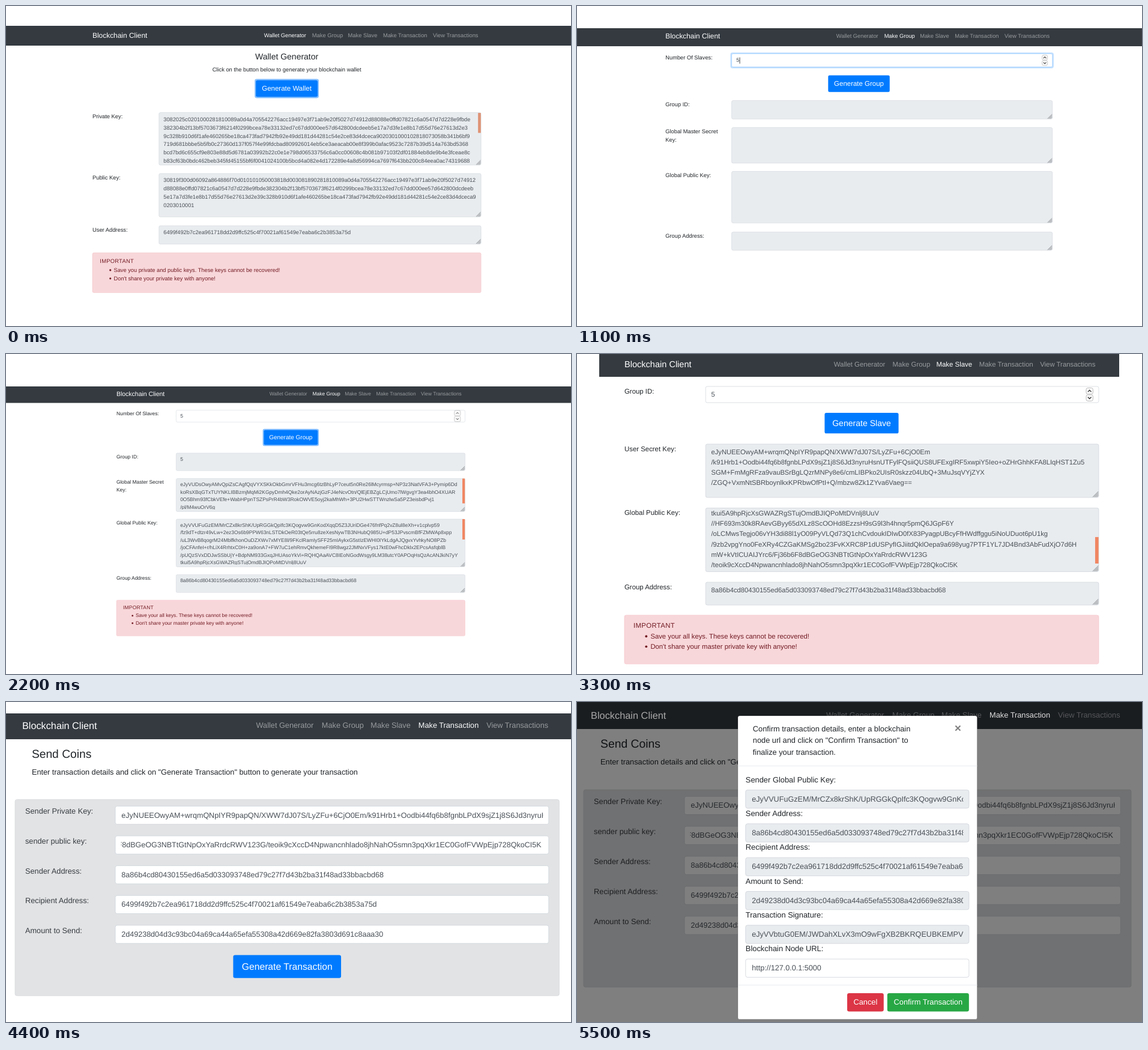
An HTML page that plays this animation: 941x533 px, repeating every 6.6 s.

```html
<!DOCTYPE html>
<html lang="en">
<head>
<meta charset="utf-8">
<title>Blockchain Client</title>
<style>
html, body { margin: 0; width: 100%; height: 100%; overflow: hidden; background: #fff; }
svg { display: block; }
text { font-family: "Liberation Sans", Arial, sans-serif; text-rendering: geometricPrecision; white-space: pre; }
</style>
</head>
<body>
<svg id="stage" width="941" height="533" viewBox="0 0 941 533"></svg>
<script>
const HOLD = 1100;
const INK = '#212529', MUTED = '#495057', BLUE = '#007bff';
const LINKS = [['Wallet Generator', 490], ['Make Group', 627.5], ['Make Slave', 730],
  ['Make Transaction', 830], ['View Transactions', 972.5]];
const LIGHT = { bar: '#343a40', brand: '#fff', link: '#999c9f', on: '#fff' };
const DARK = { bar: '#1a1d20', brand: '#a8a8a8', link: '#55575a', on: '#dedede' };

const text = (x, y, str, size = 16, fill = INK, extra = '') =>
  `<text x="${x}" y="${y}" font-size="${size}" fill="${fill}" ${extra}>${str}</text>`;
const mid = 'text-anchor="middle"';
const box = (x, y, w, h, fill, stroke = 'none', extra = '') =>
  `<rect x="${x}" y="${y}" width="${w}" height="${h}" rx="4" fill="${fill}" stroke="${stroke}" ${extra}/>`;
const bar = (x, y, w, h, fill, extra = '') =>
  `<rect x="${x}" y="${y}" width="${w}" height="${h}" fill="${fill}" ${extra}/>`;
const group = (x, y, s, body) => `<g transform="translate(${x} ${y}) scale(${s})">${body}</g>`;
const label = (y, str, x = 0, fill = INK) =>
  str.split('\n').map((line, i) => text(x, y + 16.3 + 24 * i, line, 16, fill)).join('');

// Text inside a control, cut off at its padding
function inner(x, y, w, h, str, { size = 15.76, scroll = 0, pad = 12, end = false } = {}) {
  const lines = str.split('\n').map((line, i) =>
    text(end ? w - 27.5 : 1, 17.5 + 24 * i - scroll, line, size, MUTED, end ? 'text-anchor="end"' : ''));
  return `<svg x="${x + 12}" y="${y + 6.5}" width="${w - 12 - pad}" height="${h - 13}">${lines.join('')}</svg>`;
}

function area(y, h, str = '', { thumb, thumbFill = '#f08763', ...opt } = {}) {
  const grip = [13, 10, 7, 4].map(d => `M${1109 - d} ${y + h - 1}L1109 ${y + h - 1 - d}`).join('');
  return box(190, y, 920, h, '#e9ecef', '#ced4da') + inner(190, y, 920, h, str, { pad: 4, ...opt }) +
    (thumb ? bar(1101.5, y + thumb[0], 8, thumb[1], thumbFill) : '') +
    `<path d="${grip}" stroke="#808387" stroke-width="1.3"/>`;
}

function input(x, y, w, str, { fill = '#fff', ...opt } = {}) {
  return box(x, y, w, 38, fill, '#ced4da') + inner(x, y, w, 38, str, opt);
}

function spinner(x, y, w, h) {
  const c = x + w / 2;
  const half = (top, dir) => box(x, top, w, h, '#fafafa', '#a5a5a5') +
    `<path d="M${c - 4} ${top + h / 2 + 2 * dir}l4 ${-4 * dir}l4 ${4 * dir}" fill="none" stroke="#333" stroke-width="1.8"/>`;
  return half(y, 1) + half(y + h + 1.6, -1);
}

function button(y, w, str, { focus = false, size = 19.75 } = {}) {
  const ring = focus ? box(555 - w / 2 - 1.6, y - 1.6, w + 3.2, 51.2, 'none', '#80bdff', 'stroke-width="3.4"') : '';
  return ring + box(555 - w / 2, y, w, 48, BLUE) + text(555, y + 30.6, str, size, '#fff', mid);
}

function alertBox(y, ...items) {
  const red = '#721c24';
  return box(0, y, 1110, 114, '#f8d7da', '#f5c6cb') +
    text(21, y + 29.6, 'IMPORTANT', 16, red, 'letter-spacing=".5"') +
    items.map((str, i) => `<circle cx="51" cy="${y + 49.5 + 24 * i}" r="2.7" fill="${red}"/>` +
      text(61, y + 54.4 + 24 * i, str, 15.87, red)).join('');
}

// top and bottom are the visible edges of the bar, left is where the page column starts
function navbar({ s, left, top, bottom, x = 0, w = 941, shift = 0, brand = 20.45 }, active, tone = LIGHT) {
  return bar(x, top, w, bottom - top, tone.bar) + group(left, bottom - 56 * s, s,
    text(0, 34.2, 'Blockchain Client', brand, tone.brand) +
    LINKS.map(([str, lx], i) => text(lx + shift, 32.7, str, 16, i === active ? tone.on : tone.link)).join(''));
}
const column = (v, body) => group(v.left, v.bottom - 56 * v.s, v.s, body);
const page = (v, active, body) => navbar(v, active) + column(v, body);

const userAddress = '6499f492b7c2ea961718dd2d9ffc525c4f70021af61549e7eaba6c2b3853a75d';
const groupAddress = '8a86b4cd80430155ed6a5d033093748ed79c27f7d43b2ba31f48ad33bbacbd68';
const amount = '2d49238d04d3c93bc04a69ca44a65efa55308a42d669e82fa3803d691c8aaa30';
const walletPrivate = `3082025c0201000281810089a0d4a705542276acc19497e3f71ab9e20f5027d74912d88088e0ffd07821c6a0547d7d228e9fbde
382304b2f13bf5703673f6214f0299bcea78e33132ed7c67dd000ee57d642800dcdeeb5e17a7d3fe1e8b17d55d76e27613d2e3
9c328b910d6f1afe460265be18ca473fad7942fb92e49dd181d44281c54e2ce83d4dceca9020301000102818073058b341b6bf9
719d681bbbe5b5fb0c27360d137f057f4e99fdcbad809926014eb5ce3aeacab00e8f399b0afac9523c7287b39d514a763bd5368
bcd7bd6c655cf9e803e88d5d6781a03992b22c0e1e798d06533756c6a0cc00608c4b081b97103f2df01884eb8de9b4e3fceae8c
b83cf63b0bdc462beb345fd45155bf6f0041024100b5bcd4a082e4d172289e4a8d56994ca7697f643bb200c84eea0ac74319688`;
const walletPublic = `30819f300d06092a864886f70d010101050003818d003081890281810089a0d4a705542276acc19497e3f71ab9e20f5027d74912
d88088e0ffd07821c6a0547d7d228e9fbde382304b2f13bf5703673f6214f0299bcea78e33132ed7c67dd000ee57d642800dcdeeb
5e17a7d3fe1e8b17d55d76e27613d2e39c328b910d6f1afe460265be18ca473fad7942fb92e49dd181d44281c54e2ce83d4dceca9
0203010001`;
const masterKey = `eJyVUDsOwyAMvQpiZsCAgfQqVYXSKkOkbGmrVFHu3mcg6tzBhLyP7ceut5n0Re26lMcyrmsp+NP3z3NatVFA3+Pymip6Dd
koRsXBqGTxTUYNKLIBBzmjMqMi2KGpyDmh4Qke2orAyNAzjGzFJ4eNcvOtn/QlEjEBZgLCjUmo7lWgvgY3ea4bhO4XUAR
0O5Bhm93fCbkVEfe+WabHPpnTSZPsPrR4bW3RokOWVE5oyj2kaMhWh+3PU2HwSTTWnzlwSa5PZ3eisbdPvj1
/pl/M4wuOrV6g`;
const publicStart = 'eJyVVUFuGzEM/MrCZx8krShK/UpRGGkQpIfc3KQogvw9GnKodXqqD5Z3JUriDGe476fnfPq2vZ8ul8eXh+v1cplvp59';
const publicJoint = 'tkui5A9hpRjcXsGWAZRgSTujOmdBJIQPoMtDVnlj8UuV';
const publicHead = `${publicStart}
/fz9dT+dtzr49vLw+2ez3Os6b9PPW63nLSTDkOeR03tQe5rru8zeXesNywTB3NHubQ985U+dP53JPvscmBfFZMWAp8xpp
/uL3WvB8qogrM24MblfkhonOuDZXWv7xMYE8l/9FKclRamIySFF25mIAykxG5stIzEWHI0IYkLdgAJQgvxYvhkyNO8PZb
/joCFAnfeI+r/hLiX4RrhtxC0H+za9onA7+FW7uC1ehRmvQkhemeFI9R8wgz2JMNxVFys17ktE0wFhcDklx2EPcsAsfqblB
/pUQzSVxDDJwSSbUjY+BdpNM933GxqJHUAsoYkVi+RQHQAaAVC8IEoNGodWsgy9LM38utcY0APOqHsQzAcANJkiN7yY
${publicJoint}`;
const publicTail = `${publicJoint}
//HF693m30k8RAevGByy65dXLz8ScOOHd8EzzsH9sG9l3h4hnqr5pmQ6JGpF6Y
/oLCMwsTegjo06vYH3di88l1yO09PyVLQd73Q1chCvdoukIDIwD0fX83PyagpUBcyFfHWdffggu5iNoUDuot6pU1kg
/9zb2vpgYno0FeXRy4CZGaKMSg2bo23FvKXRC8P1dUSPyfIGJiitdQklOepa9a698yug7PTF1YL7JD4Bnd3AbFudXjO7d6H
mW+kVtICUAIJYrc6/Fj36b6F8dBGeOG3NBTtGtNpOxYaRrdcRWV123G
/teoik9cXccD4Npwancnhlado8jhNahO5smn3pqXkr1EC0GofFVWpEjp728QkoCI5K`;
const userSecret = `eJyNUEEOwyAM+wrqmQNpIYR9papQN/XWW7dJ07S/LyZFu+6CjO0Em
/k91Hrb1+Oodbi44fq6b8fgnbLPdX9sjZ1j8S6Jd3nyruHsnUTFylFQsiiQUS8UFExgIRF5xwpiY5Ieo+oZHrGhhKFA8LIqHST1Zu5
SGM+FmMgRFza9vauBSrBgLQzrMNPy8e6/cmLIBPko2UIsR0skzz04UbQ+3MuJsqVYjZYX
/ZGQ+VxmNtSBRboynlkxKPRbwOfPtI+Q/mbzw8Zk1ZYva6Vaeg==`;
const keysLost = 'Save your all keys. These keys cannot be recovered!';
const keepMaster = "Don't share your master private key with anyone!";

function wallet() {
  return page({ s: .583, left: 144, top: 33, bottom: 66 }, 0,
    text(555, 95.5, 'Wallet Generator', 24, INK, mid) +
    text(555, 130, 'Click on the button below to generate your blockchain wallet', 16, INK, mid) +
    button(154.6, 176.5, 'Generate Wallet', { focus: true }) +
    label(247.3, 'Private Key:') + area(247.3, 150, walletPrivate, { thumb: [1, 57], thumbFill: '#de9375' }) +
    label(421.4, 'Public Key:') + area(421.4, 124, walletPublic) +
    label(570.6, 'User Address:') + area(570.6, 52.5, userAddress) +
    alertBox(647.8, 'Save you private and public keys. These keys cannot be recovered!',
      "Don't share your private key with anyone!"));
}

function emptyGroup() {
  return page({ s: .5806, left: 147.3, top: 37, bottom: 67 }, 1,
    label(77.5, 'Number Of Slaves:') +
    box(188.2, 75.7, 923.6, 41.6, 'none', '#bfdeff', 'stroke-width="3.6"') +
    box(190, 77.5, 920, 38, '#fff', '#80bdff') + inner(190, 77.5, 920, 38, '5') +
    bar(212.5, 88, 1.4, 18, INK) + spinner(1080.5, 81.5, 15.5, 14) +
    button(139.5, 176.5, 'Generate Group') +
    label(211.9, 'Group ID:') + area(211.9, 53) +
    label(289.4, 'Global Master Secret\nKey:') + area(289.4, 102) +
    label(415, 'Global Public Key:') + area(415, 148) +
    label(589, 'Group Address:') + area(589, 52.5));
}

function filledGroup() {
  const size = 16.1;
  return page({ s: .523, left: 184, top: 54, bottom: 81.5, shift: -3, brand: 20 }, 1,
    label(79, 'Number Of Slaves:') + input(190, 79, 920, '5', { size }) + spinner(1076, 80, 19.5, 17) +
    button(142, 172, 'Generate Group', { focus: true, size: 19.1 }) +
    label(215.7, 'Group ID:') + area(215.7, 56, '5', { size }) +
    label(296.9, 'Global Master Secret\nKey:') + area(296.9, 105, masterKey, { size, thumb: [0, 79] }) +
    label(426, 'Global Public Key:') + area(426, 152, publicHead, { size, thumb: [0, 65] }) +
    label(602.9, 'Group Address:') + area(602.9, 57, groupAddress, { size }) +
    alertBox(684.1, keysLost, keepMaster));
}

function slave() {
  return page({ s: .7117, left: 79, top: 0, bottom: 38, x: 37, w: 866 }, 2,
    label(78.5, 'Group ID:') + input(190, 78.5, 920, '5') + spinner(1080.5, 82, 16, 14.5) +
    button(140.4, 173, 'Generate Slave') +
    label(213.4, 'User Secret Key:') + area(213.4, 125, userSecret) +
    label(363, 'Global Public Key:') + area(363, 149, publicTail, { scroll: 6, thumb: [68, 62] }) +
    label(536.6, 'Group Address:') + area(536.6, 53.5, groupAddress) +
    alertBox(613.9, keysLost, keepMaster));
}

function sendForm() {
  const rows = [
    ['Sender Private Key:', userSecret.replace(/\n/g, '').slice(0, 140)],
    ['sender public key:', publicTail.replace(/\n/g, '').slice(-110), { end: true }],
    ['Sender Address:', groupAddress],
    ['Recipient Address:', userAddress],
    ['Amount to Send:', amount]];
  return text(20, 94.8, 'Send Coins', 24.2) +
    text(20, 129.8, 'Enter transaction details and click on "Generate Transaction" button to generate your transaction') +
    box(-15, 182.4, 1140, 411, '#e2e3e5', '#d6d8db') +
    rows.map(([name, value, opt], i) => {
      const y = 196.2 + 62.4 * i;
      return label(y, name, 6.3, '#383d41') + input(195, y, 908, value, opt);
    }).join('') +
    button(508.2, 226, 'Generate Transaction');
}

function modal() {
  const rows = [
    ['Sender Global Public Key:', publicStart], ['Sender Address:', groupAddress],
    ['Recipient Address:', userAddress], ['Amount to Send:', amount],
    ['Transaction Signature:', 'eJyVVbtuG0EM/JWDahXLvX3mO9wFgXB2BKRQEUBKEMPV'],
    ['Blockchain Node URL:', 'http://127.0.0.1:5000']];
  const intro = ['Confirm transaction details, enter a blockchain',
    'node url and click on "Confirm Transaction" to', 'finalize your transaction.'];
  const action = (x, w, str, fill) => box(x, 577.5, w, 38, fill) + text(x + w / 2, 601.2, str, 16, '#fff', mid);
  return group(268, 23, .8,
    box(0, 0, 498, 632, '#fff', 'rgba(0,0,0,.2)') +
    intro.map((str, i) => text(31, 32.3 + 24.3 * i, str)).join('') +
    text(458, 34, '×', 24, '#808080', mid + ' font-weight="bold"') +
    bar(0, 103.8, 498, 1.2, '#e9ecef') + bar(0, 560, 498, 1.2, '#e9ecef') +
    rows.map(([name, value], i) => {
      const y = 154.4 + 70.4 * i;
      return text(16, y - 16, name, 16.1) + input(16, y, 465, value, { fill: i < 5 ? '#e9ecef' : '#fff' });
    }).join('') +
    action(227.5, 76, 'Cancel', '#dc3545') + action(311, 170, 'Confirm Transaction', '#28a745'));
}

const send = () => page({ s: .795, left: 27, top: 19, bottom: 62 }, 3, sendForm());

function confirmSend() {
  const view = { s: .8, left: 23, top: 0, bottom: 45 };
  return column(view, sendForm()) + bar(0, 0, 941, 533, '#000', 'opacity=".5"') +
    navbar(view, 3, DARK) + modal();
}

const stage = document.getElementById('stage');
stage.innerHTML = [wallet, emptyGroup, filledGroup, slave, send, confirmSend]
  .map(draw => `<g display="none">${draw()}</g>`).join('');
const scenes = [...stage.children];

function render(ms) {
  const now = Math.floor(ms / HOLD) % scenes.length;
  scenes.forEach((g, i) => g.setAttribute('display', i === now ? 'inline' : 'none'));
}

const start = performance.now();
function tick() {
  render(performance.now() - start);
  requestAnimationFrame(tick);
}
tick();
</script>
</body>
</html>
```
